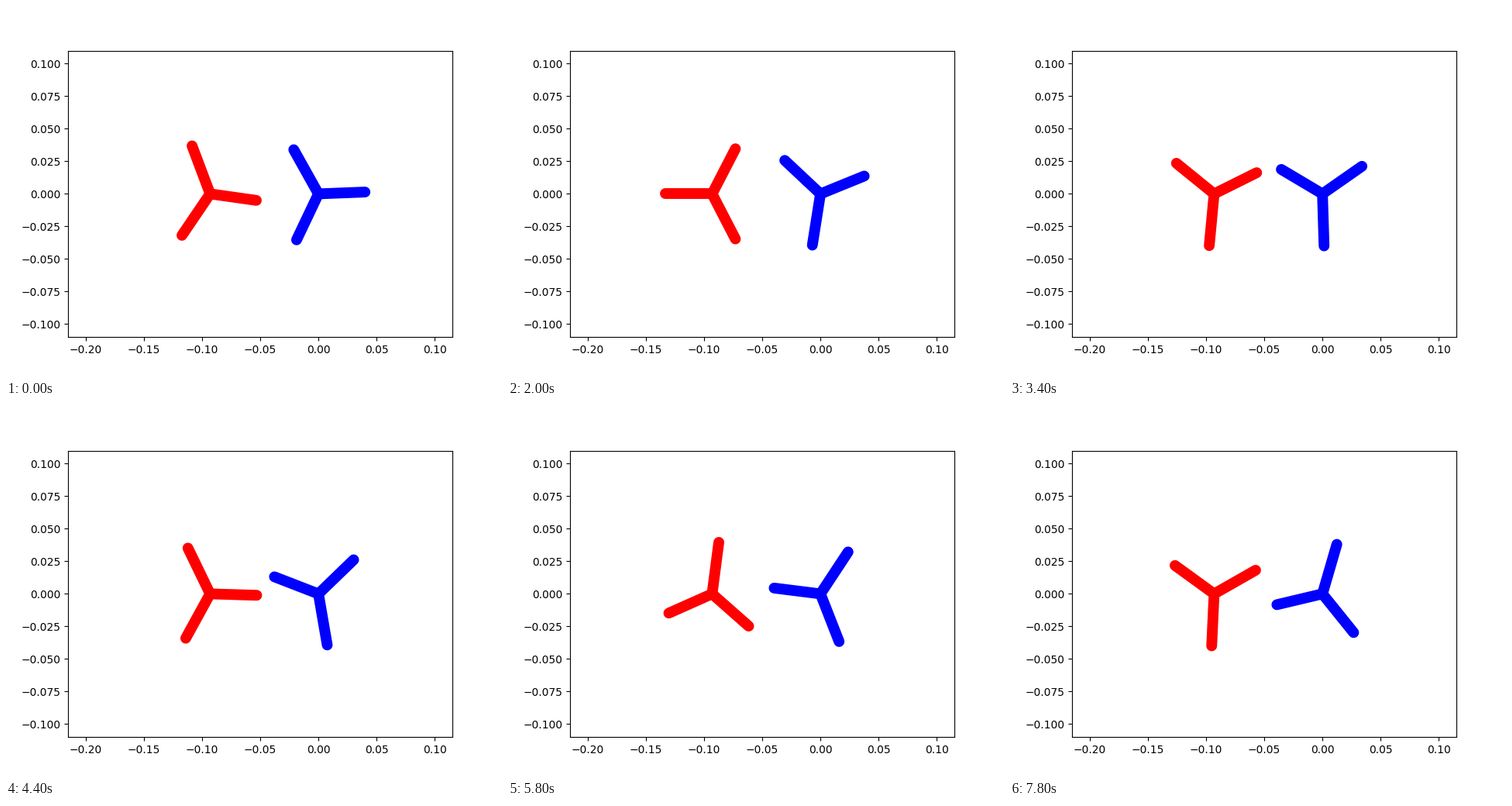
These frames come from a looping animation (640x480 px, 8 s). A matplotlib script:

```python
import numpy as np
import matplotlib.pyplot as plt
from matplotlib.animation import FuncAnimation

FRAMES = 40
STEP_MS = 200
ARM = 0.04
GAP = 0.093

# The speeds waver slightly, so each rotor follows a few angle keys (degrees).
KEYS = [0, 4, 10, 17, 26, 33, 39]
RED_DEG = [-7.2, -28, -60, -96, -142, -180, -213]
BLUE_DEG = [2.0, 9.0, 20.0, 32.0, 48.0, 61.1, 72.0]

fig, ax = plt.subplots(figsize=(6.4, 4.8), dpi=100)
ax.set_xlim(-0.215, 0.115)
ax.set_ylim(-0.11, 0.11)


def make_rotor(color):
    return [ax.plot([], [], color=color, lw=10, solid_capstyle="round")[0]
            for _ in range(3)]


def turn(arms, cx, degrees):
    for k, arm in enumerate(arms):
        a = np.radians(degrees + 120 * k)
        arm.set_data([cx, cx + ARM * np.cos(a)], [0, ARM * np.sin(a)])


red = make_rotor("red")
blue = make_rotor("blue")


def update(n):
    turn(red, -GAP, np.interp(n, KEYS, RED_DEG))
    turn(blue, 0, np.interp(n, KEYS, BLUE_DEG))
    return red + blue


anim = FuncAnimation(fig, update, frames=FRAMES, interval=STEP_MS,
                     repeat=True, repeat_delay=0)
plt.show()
```
